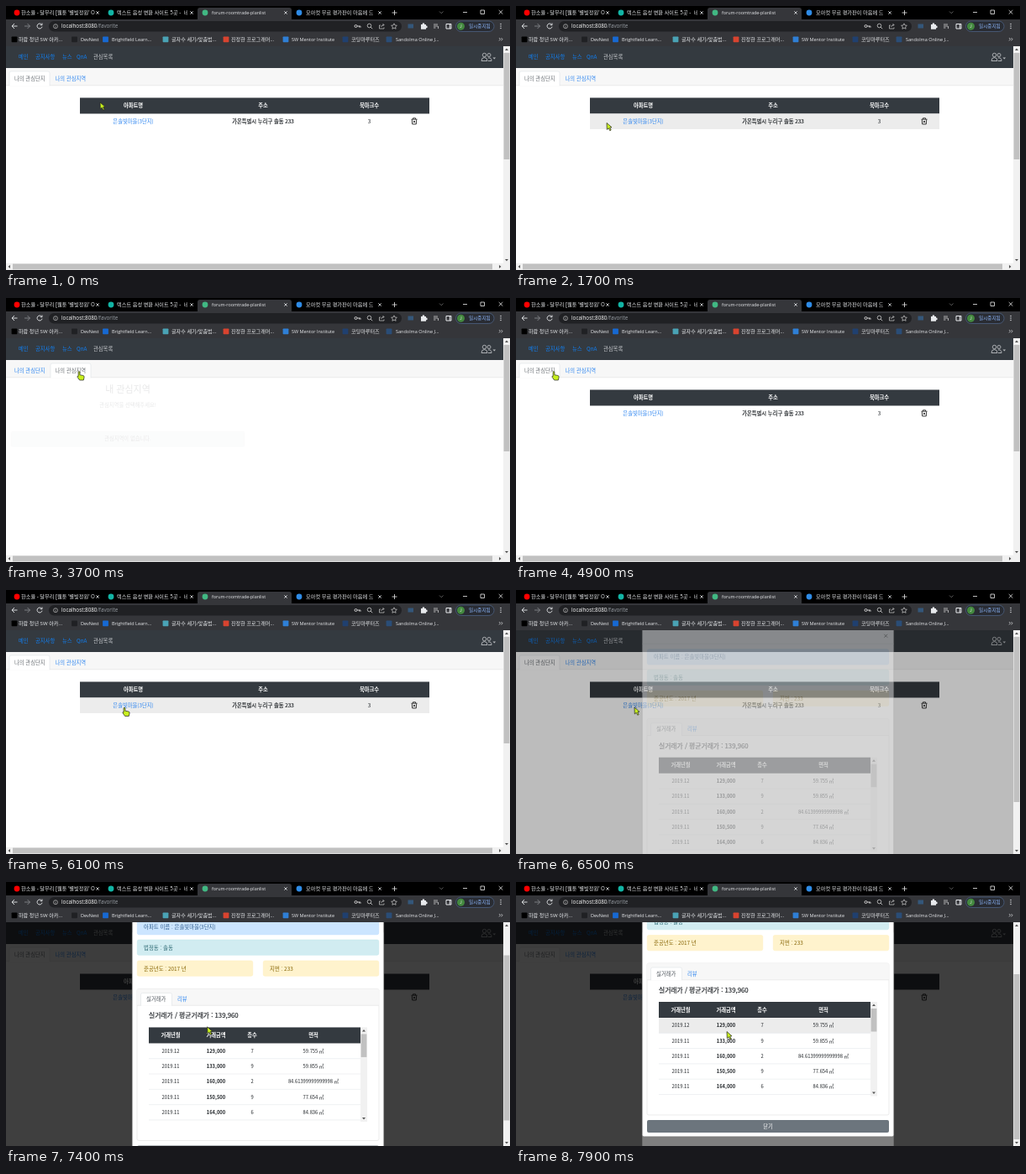
Write an HTML page that moves like this. It is 600 by 315 pixels and loops after 8000 ms.

```html
<!DOCTYPE html>
<html lang="ko">
<head>
<meta charset="utf-8">
<style>
html, body { margin: 0; height: 100%; overflow: hidden; background: #fff }
svg { display: block; width: 100vw; height: 100vh }
text { font-family: "Noto Sans CJK KR", "Noto Sans CJK", "Noto Sans", sans-serif; white-space: pre }
.ui { font-family: "Open Sans", "Noto Sans CJK KR", sans-serif }
.medium { stroke: #212529; stroke-width: .18px }
</style>
</head>
<body>
<svg id="stage" viewBox="0 0 600 315"></svg>
<script>
const LOOP = 8000, SCROLL = 73, ROW = 18.3;
const DARK = '#343a40', INK = '#212529', BLUE = '#2f86f0', LIGHT = '#d5d7da';
const APT = '은솔빛마을(3단지)';

const rect = (x, y, w, h, fill, more = '') =>
  `<rect x="${x}" y="${y}" width="${w}" height="${h}" fill="${fill}" ${more}/>`;
const dot = (x, y, r, fill) => `<circle cx="${x}" cy="${y}" r="${r}" fill="${fill}"/>`;
const line = (d, color = LIGHT, w = 0.9, more = '') =>
  `<path d="${d}" fill="none" stroke="${color}" stroke-width="${w}" ${more}/>`;
// y is the middle of the line of text
const text = (x, y, s, size = 6.3, fill = INK, more = '') =>
  `<text x="${x}" y="${y + size * 0.36}" font-size="${size}" fill="${fill}" ${more}>${s}</text>`;
const mid = (x, y, s, size, fill, more = '') =>
  text(x, y, s, size, fill, 'text-anchor="middle" ' + more);
const bold = (x, y, s, size, fill) => mid(x, y, s, size, fill, 'font-weight="700"');
const cross = (x, y, r, color, w) =>
  line(`M${x - r} ${y - r}l${2 * r} ${2 * r}m0 ${-2 * r}l${-2 * r} ${2 * r}`, color, w);
const arrow = (x, y, dx, dy) =>
  `<path d="M${x + dx * 1.5} ${y + dy * 1.5}L${x - dx + dy * 2} ${y - dy + dx * 2}L${x - dx - dy * 2} ${y - dy - dx * 2}Z" fill="#555"/>`;
const vbar = (x, y, h, id, top, size) =>
  rect(x, y, 8, h, '#f1f1f1') + arrow(x + 4, y + 4, 0, -1) + arrow(x + 4, y + h - 4, 0, 1) +
  rect(x + 0.6, top, 6.8, size, '#c1c1c1', `id="${id}"`);
const tabBox = (x, y, w, h) =>
  `<path d="M${x} ${y + h}V${y + 2}q0 -2 2 -2h${w - 4}q2 0 2 2V${y + h}" fill="#fff" stroke="#dee2e6" stroke-width=".6"/>`;

function browser() {
  let s = rect(0, 0, 600, 48, '#35363a') + rect(0, 0, 600, 16, '#000') +
    '<path d="M228 16V5q0 -3 3 -3H337q3 0 3 3V16Z" fill="#35363a"/>';
  const tabs = [
    [13, 18, '#f00', "한소율 - 달무리 [웹툰 '별빛정원' O", 88],
    [125, 132, '#12b5a5', '텍스트 음성 변환 사이트 5곳 -  네', 84],
    [237, 245, '#41b883', 'forum-roomtrade-planlist', 84],
    [349, 357, '#2e8be6', '모아컷 무료 평가판이 마음에 드', 80]];
  tabs.forEach(([cx, x, color, title, w], i) => {
    s += dot(cx, 8, 3.4, color) +
      `<clipPath id="tab${i}">${rect(x, 0, w, 16, '#000')}</clipPath>` +
      text(x, 8, title, i == 2 ? 5.4 : 6.2, '#e8eaed', `class="ui" clip-path="url(#tab${i})"`) +
      cross(109 + 112 * i, 8, 1.7, '#e8eaed', 0.8);
  });
  s += line('M459.500 8h6m-3 -3v6M544 7.500h5M565 5h4.500v4.500h-4.500z', '#eee', 0.8) +
    line('M516 6.500l2.300 2.300l2.300 -2.300', '#777', 0.8) + cross(589, 7.300, 2.300, '#eee', 0.8);

  // address bar
  s += line('M13.500 24h-6.500m3 -3l-3 3l3 3', '#e8eaed') + line('M22 24h6.500m-3 -3l3 3l-3 3', '#85878b') +
    line('M42.500 22.200a3 3 0 1 0 .5 2.500M43 20.500v2.200h-2.200', '#e8eaed') +
    rect(51, 18, 420, 12.500, '#202124', 'rx="6.200"') +
    '<circle cx="59" cy="24.200" r="2.500" fill="none" stroke="#bbb" stroke-width=".7"/>' + line('M59 23.800v1.800M59 22.500v.6', '#bbb', 0.7) +
    text(66, 24.200, 'localhost:8080<tspan fill="#9aa0a6">/favorite</tspan>', 6.3, '#fff', 'class="ui"') +
    '<circle cx="416.500" cy="24" r="1.500" fill="none" stroke="#ccc"/>' + line('M418 24h4v1.800m-1.500 -1.800v1.500', '#ccc') +
    '<circle cx="432.500" cy="23.500" r="2.300" fill="none" stroke="#ccc" stroke-width=".8"/>' + line('M434.200 25.200l2 2', '#ccc') +
    line('M446 23h-1.500v4h5.500v-1.500M446.500 25q.5 -2.500 3.500 -2.500m-1.500 -1.500l1.500 1.500l-1.500 1.500', '#ccc', 0.7) +
    line('M462 20.800l1 2.200l2.400 .3l-1.800 1.600l.5 2.400l-2.100 -1.200l-2.100 1.200l.5 -2.400l-1.800 -1.600l2.400 -.3z', '#ccc', 0.7) +
    rect(478.500, 21.500, 6.500, 5, '#34577a') +
    '<path d="M494 22h1.700a1.300 1.300 0 1 1 2.500 0h1.800v1.700a1.300 1.300 0 1 1 0 2.500v1.500h-6z" fill="#e8eaed"/>' +
    line('M509 22h5m-5 2h5m-5 2h2.500M514.500 24v3', '#ccc', 0.8) +
    line('M524 21.500h6v5.500h-6zM528.300 21.500v5.500', '#e8eaed', 1) +
    rect(535.500, 18, 45.500, 12.500, '#292c33', 'rx="6.200" stroke="#56719b" stroke-width=".6"') +
    dot(541.500, 24.200, 4.500, '#43893f') + mid(541.500, 24.200, 'J', 4.500, '#fff') +
    text(551, 24.200, '일시중지됨', 5.6, '#8ab4f8') +
    [21.500, 24, 26.500].map(y => dot(589, y, 0.7, '#e8eaed')).join('');

  // bookmarks
  const marks = [[10, 15, '#000', '하람 청년 SW 아카...'], [81.500, 89, '#202124', 'DevNest'],
    [118.500, 126, '#1769d2', 'Brightfield Learn...'], [190, 197, '#4aa3b5', '글자수 세기/맞춤법...'],
    [262, 268, '#d8432f', '진정한 프로그래머...'], [333, 340, '#2f7fd6', 'SW Mentor Institute'],
    [404, 411, '#20406f', '코딩마루터즈'], [456, 464, '#2a4d77', 'Sandolma Online J...']];
  for (const [cx, x, color, label] of marks) {
    const korean = /[가-힣]/.test(label);
    s += rect(cx - 3.400, 36.500, 6.800, 6.800, color, 'rx=".8"') +
      text(x, 39.800, label, korean ? 6.1 : 5.5, '#e8eaed', 'class="ui"');
  }
  return s + line('M587 38l1.500 1.700l-1.500 1.700m2.500 -3.400l1.500 1.700l-1.500 1.700', '#e8eaed', 0.7);
}

function page() {
  let s = rect(0, 48, 600, 267, '#fff') + rect(0, 48, 592, 26, DARK);
  [[15, '메인'], [35, '공지사항'], [67, '뉴스'], [84, 'QnA'], [104, '관심목록']].forEach(([x, label], i) =>
    s += text(x, 61, label, 6.3, i == 4 ? '#c8cbce' : '#1180f5'));
  s += '<g fill="none" stroke="#b9bcbf" stroke-width=".9"><circle cx="569.500" cy="58.500" r="2.200"/><circle cx="575" cy="58.500" r="2"/>' +
    '<path d="M566 65.500q0 -4 3.500 -4t3.500 4zM574 62q4 -.8 4 3.500h-4"/></g>' +
    '<path d="M579.500 61.500h3.600l-1.800 2z" fill="#b9bcbf"/>' +
    rect(0, 74, 592, 21, '#f7f7f7') + line('M0 94.800H592', '#dfdfdf', 0.6) +
    `<g id="box0">${tabBox(4, 78, 48, 17.200)}</g><g id="box1">${tabBox(53, 78, 48, 17.200)}</g>` +
    text(10, 86.500, '나의 관심단지', 6.3, BLUE, 'id="tabText0"') +
    text(58.500, 86.500, '나의 관심지역', 6.3, BLUE, 'id="tabText1"');

  s += '<g id="list">' + rect(88, 109.500, 416, 19, DARK) +
    rect(88, 128.500, 416, 18.500, '#ececec', 'id="listHover"') +
    bold(151.500, 118.500, '아파트명', 6.3, '#fff') + bold(306, 118.500, '주소', 6.3, '#fff') + bold(432.500, 118.500, '북마크수', 6.3, '#fff') +
    mid(151.500, 137.300, APT, 6.3, BLUE) +
    mid(306, 137.300, '가온특별시 누리구 솔동 233', 6.3, INK, 'class="medium"') +
    mid(432.500, 137.300, '3', 6.3, INK) +
    line('M482.500 135.200h7M484.500 135v-1.200h3v1.200M483.300 135.500l.4 5.500h4.600l.4 -5.500M485 137l2 2.300m0 -2.300l-2 2.300', '#111', 0.8) + '</g>';

  s += '<g id="region">' + mid(145, 109.500, '내 관심지역', 11) +
    mid(145, 128, '관심지역을 선택해주세요!', 6.3) +
    rect(6, 159, 278, 18.500, '#e2e3e5', 'rx="2" stroke="#d6d8db" stroke-width=".5"') +
    mid(145, 168, '관심지역이 없습니다.', 6.3, '#383d41') + '</g>';

  return s + '<g id="pageBars">' + rect(0, 307, 600, 8, '#f1f1f1') + rect(8, 307.600, 571, 6.800, '#c1c1c1') +
    arrow(4, 311, -1, 0) + arrow(588, 311, 1, 0) + vbar(592, 48, 259, 'pageThumb', 56, 127) + '</g>';
}

const shade = id => rect(0, 48, 600, 267, '#000', `id="${id}"`);
const sheet = (more = '') => rect(150.300, 59, 299.400, 317.800, '#fff', 'rx="2" ' + more);

function modal() {
  const alert = (x, y, w, label, fill, edge, ink) =>
    rect(x + 0.25, y, w - 0.5, 18.300, fill, `rx="2" stroke="${edge}" stroke-width=".5"`) + text(x + 8, y + 9.300, label, 6.4, ink);
  const cols = [196, 250, 293, 366];
  const rows = [['2019.12', '129,000', 7, '59.755'], ['2019.11', '133,000', 9, '59.855'],
    ['2019.11', '160,000', 2, '84.61399999999998'], ['2019.11', '150,500', 9, '77.654'], ['2019.11', '164,000', 6, '84.836']];
  let s = sheet('stroke="#777" stroke-width=".5"') +
    line('M150 80.500H450', '#dee2e6', 0.6) + cross(440.300, 71, 1.900, '#555', 1) +
    alert(156, 87, 288, '아파트 이름 : ' + APT, '#cce5ff', '#b8daff', '#34618f') +
    alert(156, 111.500, 288, '법정동 : 솔동', '#d1ecf1', '#bee5eb', '#2b6771') +
    alert(156, 136.500, 138, '준공년도 : 2017 년', '#fff3cd', '#ffeeba', '#856404') +
    alert(306, 136.500, 138, '지번 : 233', '#fff3cd', '#ffeeba', '#856404') +
    rect(156, 170, 288, 181, '#fff', 'rx="2" stroke="#dfdfdf" stroke-width=".6"') +
    rect(156.300, 170.300, 287.400, 19.500, '#f7f7f7') + line('M156 189.800H444', '#dfdfdf', 0.6) +
    tabBox(160.500, 175, 37, 15.200) + text(167, 182.500, '실거래가', 6.3, '#495057') + text(204, 182.500, '리뷰', 6.3, BLUE) +
    text(170, 202, '실거래가 / 평균거래가 : 139,960', 7.8, INK, 'class="medium"') +
    rect(170, 216, 252, 19, DARK) + rect(170, 235, 252, ROW, '#ececec', 'id="dealHover"');
  ['거래년월', '거래금액', '층수', '면적'].forEach((label, i) => s += bold(cols[i], 225.500, label, 6.3, '#fff'));
  rows.forEach((row, r) => {
    const y = 235 + ROW * r;
    s += line(`M170 ${y + ROW}H422`, '#dee2e6', 0.5);
    row.forEach((v, c) => s += (c == 1 ? bold : mid)(cols[c], y + 9.200, c == 3 ? v + ' ㎡' : v, 5.8, INK));
  });
  return s + vbar(422, 216, 112.500, 'dealThumb', 224, 27.500) +
    rect(156, 357, 288, 15, '#6c757d', 'rx="2"') + mid(300, 364.500, '닫기', 6.3, '#fff');
}

// the dialog opens twice: a covered sheet stays unscrolled between two shades
const stage = document.getElementById('stage');
stage.innerHTML = page() + shade('shade0') + `<g id="under">${sheet()}</g>` + shade('shade1') +
  `<g id="modal">${modal()}</g><g id="modalBar">${vbar(592, 48, 267, 'modalThumb', 56, 197)}</g>` + browser() +
  '<g id="mouse" fill="#c8f01e" stroke="#222" stroke-width=".7" stroke-linejoin="round">' +
  '<path id="pointer" d="M0 0L.3 8L2.200 6.300L3.800 9.300L5.200 8.500L3.700 5.700L6 5.300Z"/>' +
  '<path id="hand" d="M-.9 .8q.9 -1.500 1.800 0V4.200l4 .8q1.500 .4 1.200 2L5.300 10.500H.6L-2 6.800q-.4 -1.600 1.100 -.9Z"/></g>';

const el = id => document.getElementById(id);
const set = (id, name, value) => el(id).setAttribute(name, value);
const show = (id, on) => set(id, 'visibility', on ? 'visible' : 'hidden');
const clamp = v => Math.max(0, Math.min(1, v));
const fade = (t, start) => clamp((t - start) / 150);
const inside = (v, a, b) => v >= a && v < b;

const path = [[0, 112, 115], [100, 112, 115], [300, 110, 134], [600, 112, 118], [800, 112, 118], [1100, 113, 124],
  [1300, 113, 124], [1700, 108, 139.5], [1900, 108, 139.5], [2200, 100, 148], [2400, 100, 148], [3200, 84, 92],
  [3400, 87, 87.500], [4200, 87, 87.500], [4500, 45, 87.500], [5100, 45, 87.500], [5900, 141, 140], [6950, 141, 140],
  [7500, 249, 176], [7900, 251, 178.500], [8000, 251, 178.500]];

function mouseAt(t) {
  const i = path.findIndex(p => p[0] > t), [t0, x0, y0] = path[i - 1], [t1, x1, y1] = path[i];
  const u = (t - t0) / (t1 - t0), e = u * u * (3 - 2 * u);
  return [x0 + (x1 - x0) * e, y0 + (y1 - y0) * e];
}

function draw(now) {
  const t = Math.floor(now % LOOP / 100) * 100;
  const [x, y] = mouseAt(t);
  const open = t >= 6430;
  const tab = inside(t, 3500, 4500) ? 1 : 0;

  const region = fade(t, 3685) * (1 - fade(t, 4520));
  set('region', 'opacity', region);
  set('list', 'opacity', t < 4000 ? 1 - fade(t, 3520) : fade(t, 4685));
  for (const i of [0, 1]) {
    show('box' + i, tab == i);
    set('tabText' + i, 'fill', tab == i ? '#6b7075' : BLUE);
  }
  show('listHover', !open && tab == 0 && inside(y, 128.5, 147));

  // dialog
  const drop = 25 * (1 - clamp((t - 6460) / 300)) ** 3;
  const u = clamp((t - 7150) / 450), scroll = SCROLL * u * u * (3 - 2 * u);
  const shown = fade(t, 6458);
  show('pageBars', !open);
  show('modalBar', open);
  for (const i of [0, 1]) set('shade' + i, 'opacity', 0.5 * shown);
  set('under', 'opacity', shown);
  set('under', 'transform', `translate(0 ${-drop})`);
  set('modal', 'opacity', shown);
  set('modal', 'transform', `translate(0 ${-drop - scroll})`);
  set('modalThumb', 'y', 56 + 54 * scroll / SCROLL);
  const row = Math.floor((y + scroll - 235) / ROW);
  const onRow = open && inside(x, 170, 422) && inside(row, 0, 5);
  set('dealHover', 'opacity', onRow ? 1 : 0);
  set('dealHover', 'y', 235 + ROW * Math.max(0, row));

  const onTab = inside(y, 78, 95) && inside(x, 4, 101);
  const onLink = tab == 0 && inside(x, 127, 176) && inside(y, 133, 141.5);
  const hand = !open && (onTab || onLink);
  show('hand', hand);
  show('pointer', !hand);
  set('mouse', 'transform', `translate(${x} ${y})`);
}

const start = performance.now();
(function tick() {
  draw(performance.now() - start);
  requestAnimationFrame(tick);
})();
</script>
</body>
</html>
```
